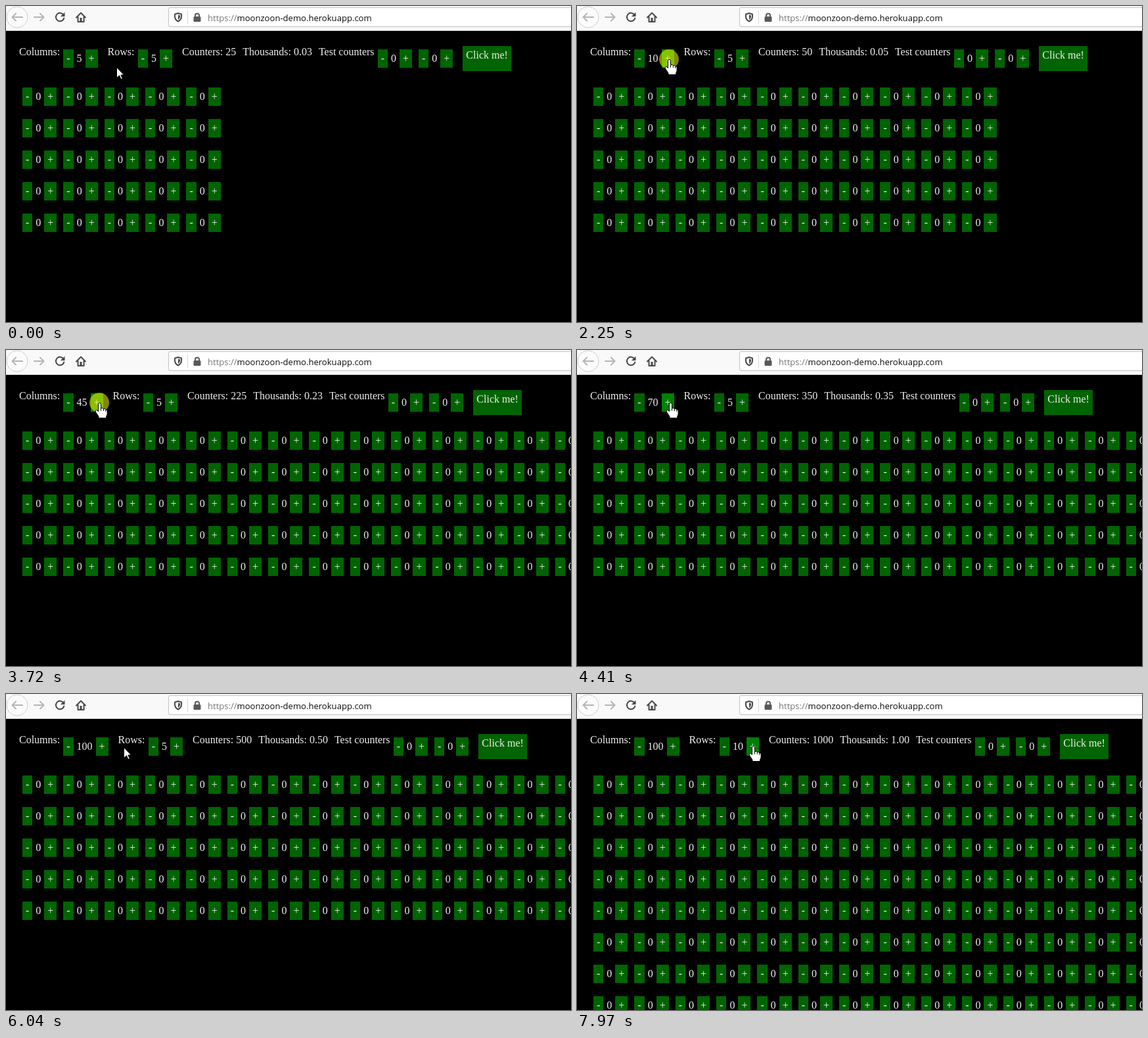
Write an HTML page that moves like this. It is 860x481 px and loops after 8 s.

```html
<!DOCTYPE html>
<html lang="en">
<head>
<meta charset="utf-8">
<title>Counters</title>
<style>
  html, body { margin: 0; width: 100%; height: 100%; overflow: hidden; background: #000; }
  svg { display: block; }
  .page { font: 16px "Liberation Serif", "Times New Roman", serif; fill: #eee; }
  .button { fill: #006400; }
  .button.hover { fill: #008000; }
  .address { font: 13.07px "Open Sans", "Noto Sans", sans-serif; fill: #0c0c0d; }
  .icon { fill: none; stroke: #48484c; stroke-width: 2; stroke-linecap: round; stroke-linejoin: round; }
  .disabled { stroke: #b4b4b6; }
  .cursor { fill: #fff; stroke: #000; stroke-linejoin: round; }
</style>
</head>
<body>
<svg width="860" height="481" viewBox="0 0 860 481">
  <rect width="860" height="481"/>
  <rect width="860" height="38" fill="#f9f9fa"/>
  <rect y="37" width="860" height="1" fill="#ccc"/>

  <circle cx="17" cy="17" r="16" fill="#fbfbfb" stroke="#cfcfd2"/>
  <path class="icon disabled" d="M25 17H10M15 11.500L9.500 17L15 22.500"/>
  <path class="icon disabled" d="M43 17H57M52 11.500L57.500 17L52 22.500"/>
  <path class="icon" d="M87.500 13.500A6.300 6.300 0 1 0 88.300 18.500"/>
  <path d="M89.500 9.500V16H83z" fill="#48484c"/>
  <path class="icon" d="M107 17.500L114 10.500L121 17.500M109.500 16V24H118.500V16"/>
  <rect x="112.500" y="18" width="3" height="6" fill="#48484c"/>

  <rect x="247.500" y="2.500" width="640" height="29" rx="2.500" fill="#fff" stroke="#c2c2c4"/>
  <path class="icon" d="M262 11L267 12.500V16Q267 21 262 23.500Q257 21 257 16V12.500z"/>
  <path d="M262 13.500V21Q265 19 265 16V14.300z" fill="#48484c"/>
  <path d="M276.500 7V28" stroke="#d7d7db"/>
  <rect x="285.500" y="16" width="11" height="8" rx="1.500" fill="#58585c"/>
  <path class="icon" style="stroke:#58585c" d="M288 16V14.500a3 3 0 0 1 6 0V16"/>
  <text class="address" x="307" y="23"><tspan fill="#77777a">https://</tspan>moonzoon-demo.herokuapp.com</text>

  <g class="page" id="bar"></g>
  <g class="page" id="grid"></g>

  <circle id="click" r="15" fill="#ff0" fill-opacity=".52"/>
  <path id="arrow" class="cursor" d="M.5 .5V16.500L4.500 12.800L7 18.500L9.300 17.600L6.900 12H11.500z"/>
  <g id="hand" class="cursor">
    <path d="M-1.500 2.500a2 2 0 0 1 4 0V8.500q3.500-.6 3.800 1q3-.5 3.400 1.200q2.400-.2 2.400 2V17q0 2-1.400 4V23.500H-1V21.500q-1-2.500-4.200-6.500q-1.500-2.800.3-3.600q1.600-.4 3.400 2.200z"/>
    <path fill="none" d="M2.500 8.500v4M6.300 9.500v3.500M9.700 10.700v3"/>
  </g>
</svg>
<script>
const LOOP = 8000, TICK = 77, HOLD = 70, STEP = 5;
const $ = id => document.getElementById(id);

// Runs of clicks; the count goes up `lag` ms after each press
const columnClicks = [
  { at: 1300, count: 1, gap: 0, lag: 250 },
  { at: 2250, count: 1, gap: 0, lag: HOLD },
  { at: 2790, count: 14, gap: 155, lag: HOLD },
  { at: 5190, count: 3, gap: 270, lag: HOLD }
];
const rowClicks = [{ at: 7040, count: 2, gap: 860, lag: 230 }];

// Pointer moves, each in a number of ticks
const start = { x: 168, y: 93 };
const moves = [
  { at: 380, ticks: 7, x: 133, y: 81 },
  { at: 1780, ticks: 3, x: 140, y: 81 },
  { at: 2640, ticks: 1, x: 142, y: 80 },
  { at: 5960, ticks: 8, x: 247, y: 95 },
  { at: 6650, ticks: 4, x: 259, y: 81 },
  { at: 7650, ticks: 2, x: 268, y: 79 }
];

const expand = runs => runs.flatMap(({ at, count, gap, lag }) =>
  Array.from({ length: count }, (_, i) => ({ press: at + i * gap, change: at + i * gap + lag })));
const columnPresses = expand(columnClicks), rowPresses = expand(rowClicks);
const presses = [...columnPresses, ...rowPresses];

const countAt = (list, t) => STEP + STEP * list.filter(p => t >= p.change).length;
const pressedAt = t => presses.some(p => t >= p.press && t < p.press + HOLD);

function pointerAt(t) {
  let { x, y } = start;
  for (const move of moves) {
    if (t < move.at) break;
    const done = Math.min(1, (Math.floor((t - move.at) / TICK) + 1) / move.ticks);
    const ease = 1 - (1 - done) ** 1.5;
    x += (move.x - x) * ease;
    y += (move.y - y) * ease ** 3;
  }
  return { x: Math.round(x), y: Math.round(y) };
}

const counterWidth = value => 44.35 + 8 * String(value).length;
const label = (x, y, s) => `<text x="${x.toFixed(2)}" y="${y}">${s}</text>`;

function button(x, y, width, height, s, hover) {
  const left = Math.round(x), right = Math.round(x + width);
  return `<rect class="button${hover ? ' hover' : ''}" x="${left}" y="${y}" width="${right - left}" height="${height}"/>`
    + label(x + 5, y + 19, s);
}

function counter(x, y, value, hover) {
  const plus = x + counterWidth(value) - 19.02;
  return button(x, y, 15.33, 28, '-') + label(x + 20.33, y + 19, value)
    + button(plus, y, 19.02, 28, '+', hover);
}

function layout(columns, rows) {
  const columnsX = 87.2;
  const rowsLabel = columnsX + counterWidth(columns) + 15;
  const rowsX = rowsLabel + 46.1;
  return { columnsX, rowsLabel, rowsX, end: rowsX + counterWidth(rows) };
}

function drawBar(columns, rows, hover) {
  const at = layout(columns, rows), total = columns * rows;
  const totalX = at.end + 15;
  const thousandsX = totalX + 76.2 + 8 * String(total).length;
  const testX = thousandsX + 115.75;
  const firstX = testX + 89.7;
  return label(20, 75, 'Columns:') + counter(at.columnsX, 66, columns, hover === 'columns')
    + label(at.rowsLabel, 75, 'Rows:') + counter(at.rowsX, 66, rows, hover === 'rows')
    + label(totalX, 75, 'Counters: ' + total)
    + label(thousandsX, 75, 'Thousands: ' + (total / 1000).toFixed(2))
    + label(testX, 75, 'Test counters')
    + counter(firstX, 66, 0) + counter(firstX + 62.35, 66, 0)
    + button(firstX + 129.7, 61, 73.5, 38, 'Click me!');
}

function drawGrid(columns, rows) {
  let out = '';
  for (let r = 0; r < Math.min(rows, 8); r++)
    for (let c = 0; c < Math.min(columns, 14); c++)
      out += counter(25 + 62.35 * c, 124 + 48 * r, 0);
  return out;
}

function hovered({ x, y }, columns, rows) {
  const at = layout(columns, rows);
  const overPlus = end => x >= end - 19.02 && x < end;
  if (y < 66 || y >= 94) return '';
  if (overPlus(at.columnsX + counterWidth(columns))) return 'columns';
  return overPlus(at.end) ? 'rows' : '';
}

const drawn = {};
function update(id, key, draw) {
  if (drawn[id] === key) return;
  drawn[id] = key;
  $(id).innerHTML = draw();
}

function place(id, { x, y }, visible) {
  $(id).setAttribute('transform', `translate(${x} ${y})`);
  $(id).style.display = visible ? '' : 'none';
}

function frame() {
  const t = performance.now() % LOOP;
  const columns = countAt(columnPresses, t), rows = countAt(rowPresses, t);
  const pointer = pointerAt(t);
  const hover = hovered(pointer, columns, rows);
  update('bar', [columns, rows, hover].join(), () => drawBar(columns, rows, hover));
  update('grid', [Math.min(columns, 14), rows].join(), () => drawGrid(columns, rows));
  place('click', pointer, pressedAt(t));
  place('arrow', pointer, !hover);
  place('hand', pointer, hover);
  requestAnimationFrame(frame);
}
frame();
</script>
</body>
</html>
```
